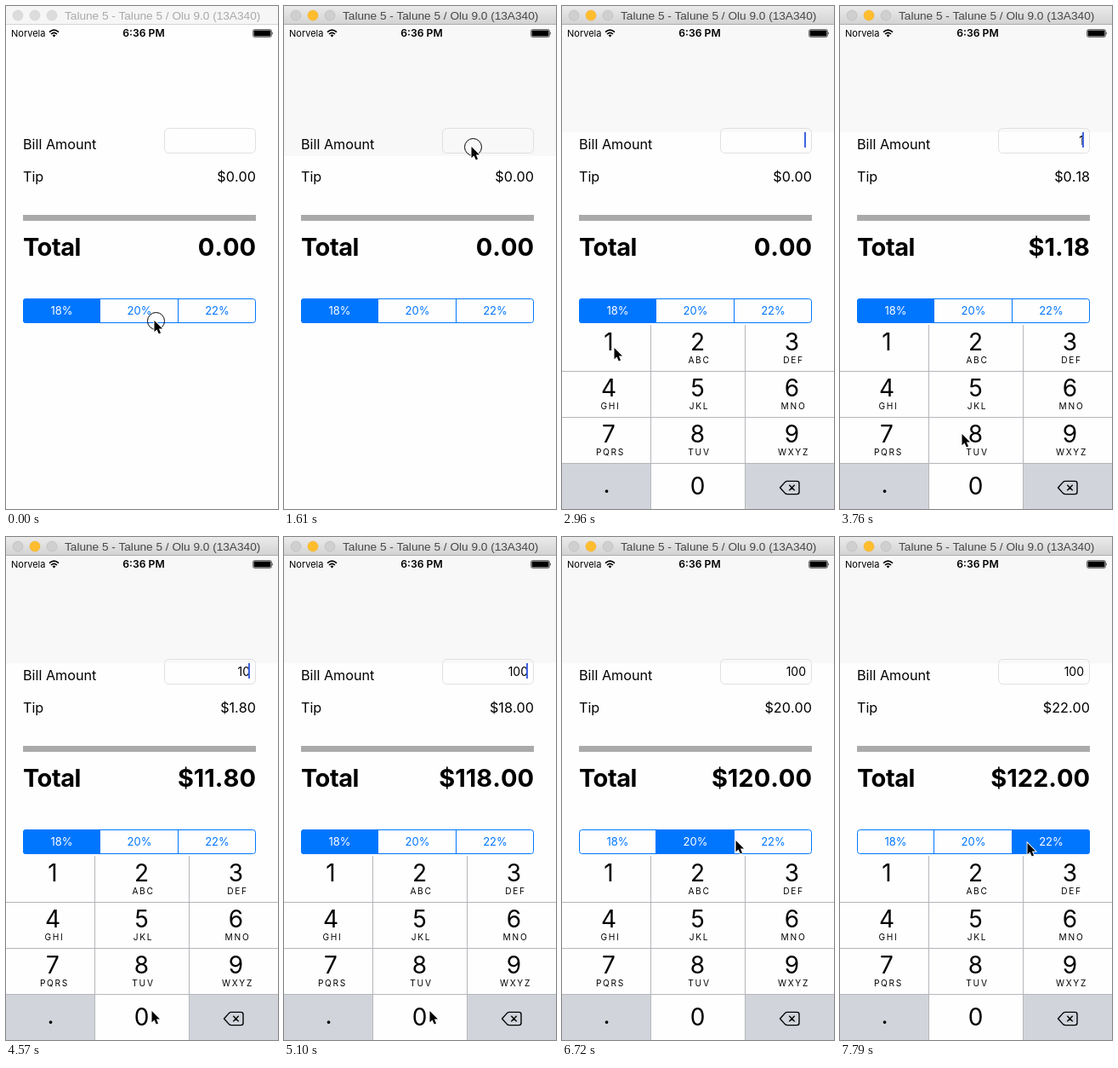
Animation of 320 by 590 pixels, one loop 8 s. Source, as an HTML page:

```html
<!DOCTYPE html>
<html lang="en">
<head>
<meta charset="utf-8">
<title>Tip calculator</title>
<style>
  html, body { margin: 0; width: 100%; height: 100%; overflow: hidden; background: #fefefe; }
  svg { display: block; font: 16.2px Inter, sans-serif; }
  .end { text-anchor: end; font-kerning: none; }
  .mid { text-anchor: middle; }
  .big { font-size: 29px; font-weight: 700; }
  .seg { font-size: 13px; fill: #0076ff; text-anchor: middle; }
  .seg.on { fill: #fff; }
  .digit { font-size: 28px; text-anchor: middle; }
  .abc { font-size: 10.2px; letter-spacing: 1.7px; text-anchor: middle; }
  .title { font: 13.65px "Liberation Sans", Arial, sans-serif; fill: #a9a9a9; }
  .light { fill: #dcdcdc; stroke: #d0d0d0; stroke-width: .6; }
  .active .title { fill: #474747; }
  .active .light { fill: #cfcfcf; stroke: #b9b9b9; }
  .active .light.amber { fill: #ffbd2e; stroke: #f2b02c; }
  .bar { fill: #f6f6f6; }
  .active .bar { fill: url(#chrome); }
  .edge { fill: #d4d4d4; }
  .active .edge { fill: #adadad; }
</style>
</head>
<body>
<svg width="320" height="590" viewBox="0 0 320 590">
  <defs>
    <linearGradient id="chrome" x2="0" y2="1">
      <stop offset="0" stop-color="#ebebeb"/><stop offset="1" stop-color="#d2d2d2"/>
    </linearGradient>
    <clipPath id="round"><rect x="20" y="343" width="274" height="29" rx="3.500"/></clipPath>
  </defs>
  <rect width="320" height="590" fill="#fefefe"/>
  <rect id="shade" width="320" height="148" fill="#f8f8f8"/>

  <g id="window">
    <rect class="bar" width="320" height="22"/>
    <rect class="edge" y="21" width="320" height="1"/>
    <circle class="light" cx="14" cy="11" r="6"/>
    <circle class="light amber" cx="34" cy="11" r="6"/>
    <circle class="light" cx="54" cy="11" r="6"/>
    <text class="title" x="69" y="16">Talune 5 - Talune 5 / Olu 9.0 (13A340)</text>
  </g>

  <text x="6" y="36" font-size="11">Norvela</text>
  <g fill="none" stroke="#000" stroke-width="1.6">
    <path d="M51 30.6Q56.5 25.6 62 30.6M53 33Q56.5 29.8 60 33"/>
    <path d="M54.6 34.4Q56.5 32.8 58.4 34.4L56.5 36.5Z" fill="#000" stroke="none"/>
  </g>
  <text class="mid" x="162" y="36" font-size="12.2" font-weight="600">6:36 PM</text>
  <rect x="290.5" y="27.5" width="22" height="9" rx="2" fill="none" stroke="#000" stroke-opacity=".55"/>
  <rect x="291.5" y="28.5" width="20" height="7" rx=".8"/>
  <path d="M313.3 30.3q1.6 1.7 0 3.4z"/>

  <text x="20" y="168">Bill Amount</text>
  <rect x="186.5" y="143.5" width="107" height="29" rx="5" fill="none" stroke="#e0e0e0"/>
  <text id="bill" class="end" x="287" y="162.500" font-size="14"></text>
  <rect id="caret" x="285" y="148" width="2" height="18" fill="#3f64e0"/>
  <text x="20" y="206">Tip</text>
  <text id="tip" class="end" x="294" y="206"></text>
  <rect x="20" y="245" width="274" height="7" fill="#aaa"/>
  <text class="big" x="20" y="293" letter-spacing="-.5">Total</text>
  <text id="total" class="big end" x="294" y="293"></text>

  <rect id="pick" y="343" height="29" fill="#0076ff" clip-path="url(#round)"/>
  <rect x="20.5" y="343.5" width="273" height="28" rx="3" fill="none" stroke="#0076ff"/>
  <path d="M110.500 343v29M202.500 343v29" stroke="#0076ff"/>
  <text class="seg" x="65.500" y="362">18%</text>
  <text class="seg" x="157" y="362">20%</text>
  <text class="seg" x="248.500" y="362">22%</text>

  <g id="keypad">
    <rect y="374" width="320" height="216" fill="#fefefe"/>
    <path d="M0 537h104v53H0zM216 537h104v53H216z" fill="#d1d5db"/>
    <rect id="down" width="104" height="54" fill="#d1d5db"/>
    <path d="M104.500 374v216M215.500 374v216M0 428.500h320M0 482.500h320M0 536.500h320" stroke="#b4b6ba"/>
    <g id="keys"></g>
    <path d="M256.500 565l6-6.600q1-1 2.400-1h11.600q2.500 0 2.500 2.500v10.200q0 2.500-2.500 2.500h-11.600q-1.400 0-2.400-1zM267.300 561.800l6.400 6.400M273.700 561.800l-6.400 6.400"
      fill="none" stroke="#000" stroke-width="1.400" stroke-linejoin="round"/>
  </g>

  <g id="mouse">
    <circle id="ring" cx="1.500" cy="-.5" r="10" fill="none" stroke="#000"/>
    <path d="M-.5-1V12.200L2.500 9.400L4.800 14.400L7 13.400L4.900 8.600H9Z" stroke="#fff" stroke-width="1.800" paint-order="stroke"/>
  </g>
</svg>
<script>
const $ = id => document.getElementById(id);
const show = (id, on) => $(id).setAttribute('visibility', on ? 'visible' : 'hidden');
const LOOP = 8000;

const columns = [55, 159.5, 270.5];
const letters = ['', 'ABC', 'DEF', 'GHI', 'JKL', 'MNO', 'PQRS', 'TUV', 'WXYZ'];
const label = (kind, x, y, text) => `<text class="${kind}" x="${x}" y="${y}">${text}</text>`;
$('keys').innerHTML = letters.map((abc, i) => {
  const x = columns[i % 3], y = 404 + 54 * Math.floor(i / 3);
  return label('digit', x, y, i + 1) + label('abc', x + 2, y + 15, abc);
}).join('') + label('digit', 52.5, 571, '.') + label('digit', 159.5, 573, 0);

// The screen refreshes about every 269 ms.
const shortTicks = [5, 14, 19, 28];
const ticks = Array.from({ length: 30 }, (_, k) =>
  270 * k - 10 * shortTicks.filter(s => k >= s).length);

// [time, x, y] of the pointer tip
const path = [
  [0, 175, 370], [1080, 221, 166], [2150, 221, 166], [2960, 62, 402],
  [3500, 62, 402], [3760, 144, 503], [4030, 172, 557], [5100, 172, 557],
  [5640, 168, 390], [5910, 166, 360], [6450, 166, 358], [6720, 205, 357],
  [6990, 221, 360], [LOOP, 221, 360]
];
const clicks = [0, 1610, 3230, 4300, 4840, 6180, 7260];
const bills = [[0, 0], [3500, 1], [4570, 10], [4840, 100]];
const choices = [[0, 0], [6450, 1], [7520, 2]];
const rates = [18, 20, 22];
const edges = [20, 110, 202, 294];
const caretStarts = [1880, 3500, 4570, 4840];

const latest = (list, t) => list.filter(e => e[0] <= t).pop()[1];

function pointer(t) {
  const i = path.findIndex(p => p[0] > t);
  const [t0, x0, y0] = path[i - 1], [t1, x1, y1] = path[i];
  const p = (t - t0) / (t1 - t0);
  return [x0 + (x1 - x0) * p, y0 + (y1 - y0) * p];
}

function draw(t) {
  const bill = latest(bills, t), choice = latest(choices, t);
  const tip = bill * rates[choice] / 100;
  $('bill').textContent = bill || '';
  $('tip').textContent = '$' + tip.toFixed(2);
  $('total').textContent = (bill ? '$' : '') + (bill + tip).toFixed(2);

  $('pick').setAttribute('x', edges[choice]);
  $('pick').setAttribute('width', edges[choice + 1] - edges[choice]);
  document.querySelectorAll('.seg').forEach((s, i) => s.classList.toggle('on', i === choice));

  $('window').classList.toggle('active', t >= 1610);
  show('shade', t >= 1610);
  $('shade').setAttribute('height', t < 1880 ? 176 : 148);

  const rise = Math.min(1, Math.max(0, (t - 1610) / 540));
  show('keypad', t >= 1880);
  $('keypad').setAttribute('transform', `translate(0 ${216 * (1 - rise) ** 2})`);

  const start = caretStarts.filter(s => s <= t).pop();
  show('caret', start !== undefined && (t - start) % 1000 < 500);

  const [x, y] = pointer(t), click = clicks.includes(t);
  $('mouse').setAttribute('transform', `translate(${x} ${y})`);
  show('ring', click);
  const one = t < 4000;
  show('down', click && t > 3000 && t < 5000);
  $('down').setAttribute('x', one ? 0 : 105);
  $('down').setAttribute('width', one ? 104 : 110);
  $('down').setAttribute('y', one ? 374 : 537);
}

const begin = performance.now();
function frame() {
  const t = (performance.now() - begin) % LOOP;
  draw(ticks.filter(k => k <= t).pop());
  requestAnimationFrame(frame);
}
frame();
</script>
</body>
</html>
```
